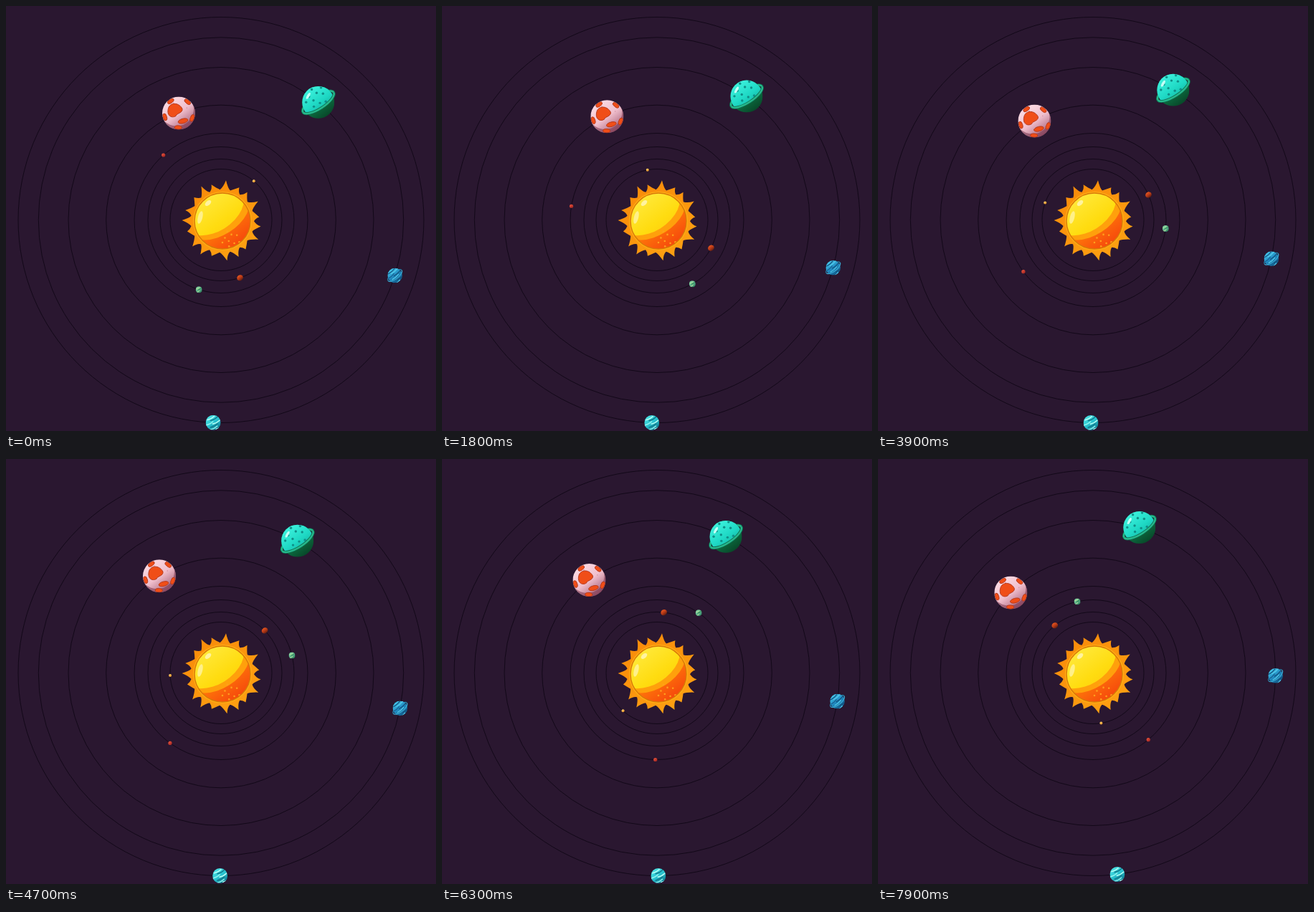
These frames come from a looping animation (600x593 px, 8000 ms). An HTML page with a canvas:

```html
<!DOCTYPE html>
<html lang="en">
<head>
<meta charset="utf-8">
<title>Solar system</title>
<style>
html, body { margin: 0; width: 100%; height: 100%; overflow: hidden; background: #2a1730; }
canvas { display: block; }
</style>
</head>
<body>
<canvas id="stage" width="600" height="593"></canvas>
<script>
const ctx = document.getElementById('stage').getContext('2d');
const LOOP = 8000, STEP = 100, CX = 300, CY = 298.5;
const RAD = Math.PI / 180, TAU = Math.PI * 2, GOLDEN = 137.5;

const polar = (r, deg) => [r * Math.cos(deg * RAD), r * Math.sin(deg * RAD)];

function paint(fill, stroke, width = 1) {
  if (fill) { ctx.fillStyle = fill; ctx.fill(); }
  if (stroke) { ctx.strokeStyle = stroke; ctx.lineWidth = width; ctx.stroke(); }
}

function oval(x, y, rx, ry, fill, tilt = 0, stroke, width) {
  ctx.beginPath();
  ctx.ellipse(x, y, rx, ry, tilt * RAD, 0, TAU);
  paint(fill, stroke, width);
}

function fade(r, ...colors) {
  const g = ctx.createLinearGradient(-r * .6, -r * .8, r * .6, r * .8);
  colors.forEach((c, i) => g.addColorStop(i / (colors.length - 1), c));
  return g;
}

// Draws the details clipped to a disc.
function ball(r, fill, details) {
  ctx.save();
  ctx.beginPath();
  ctx.arc(0, 0, r, 0, TAU);
  ctx.clip();
  ctx.fillStyle = fill;
  ctx.fillRect(-r, -r, 2 * r, 2 * r);
  details();
  ctx.restore();
}

// Dots on a sunflower spiral.
function dots(count, spread, size, color, x = 0, y = 0) {
  for (let i = 1; i <= count; i++) {
    const [dx, dy] = polar(spread * Math.sqrt(i / count), i * GOLDEN);
    oval(x + dx, y + dy, size, size, color);
  }
}

// Slanted bands of alternating colour, broken up by a sine.
function bands(r, gap, tilt, colors) {
  ctx.save();
  ctx.rotate(tilt * RAD);
  for (let y = -r + gap, i = 0; y < r; y += gap, i++) {
    const x = r * .5 * Math.sin(i * 2.4);
    ctx.beginPath();
    ctx.moveTo(x - r * .6, y);
    ctx.quadraticCurveTo(x, y + gap * .6, x + r * .6, y);
    paint(null, colors[i % colors.length], gap * .5);
  }
  ctx.restore();
}

function hoop(rx, ry, tilt, from, color, width) {
  ctx.beginPath();
  ctx.ellipse(0, 0, rx, ry, tilt * RAD, from * RAD, (from + 180) * RAD);
  paint(null, color, width);
}

function sun() {
  const rays = 19, turn = 360 / rays, first = -85;
  ctx.save();
  ctx.translate(302, 300);
  ctx.beginPath();
  ctx.moveTo(...polar(44, first - turn / 2));
  for (let i = 0; i < rays; i++) {
    const a = first + i * turn;
    const tip = polar(54 + 3 * Math.cos(i * 2.2), a + 3 * Math.sin(i * 2));
    ctx.quadraticCurveTo(...polar(47, a - turn / 5), ...tip);
    ctx.quadraticCurveTo(...polar(46, a + turn / 4), ...polar(44, a + turn / 2));
  }
  paint(fade(55, '#f98c0a', '#fda012'));
  oval(0, 0, 41, 41, '#ffae14');
  ball(39, fade(39, '#ff9a08', '#ff7a0a', '#f64a0c'), () => {
    oval(-6, -9, 48, 29, '#ffa00c', -32);
    oval(-14, -17, 48, 32, fade(39, '#ffe838', '#ffdc10', '#ffc40c'), -32);
    dots(9, 13, 1.3, '#ffa01d', 12, 25);
    oval(-31, -5, 3.2, 9, '#fff08a', 14);
    oval(-20, -25, 5, 3, '#fff3a0', -40);
  });
  oval(0, 0, 39, 39, null, 0, '#d97808', 1.4);
  ctx.restore();
}

function rosy() {
  const land = '#f04e18', edge = '#b5381c';
  ball(23, fade(23, '#fbdbe3', '#f0bfcd', '#a8647c'), () => {
    ctx.beginPath();
    ctx.arc(0, 0, 26, 0, TAU);
    ctx.arc(-3, -6, 24, 0, TAU, true);
    paint('rgba(110,45,70,.5)');
    dots(10, 19, .9, '#d99bab');
    for (let a = -124; a < 200; a += 72) oval(...polar(20, a), 2.6, 5, land, a, edge);
    oval(6, 11, 7, 3.2, land, -15, edge);
    ctx.beginPath();
    ctx.moveTo(-14, -8);
    ctx.bezierCurveTo(-10, -16, 1, -14, 5, -6);
    ctx.bezierCurveTo(6, 0, -3, 0, -4, 4);
    ctx.bezierCurveTo(-10, 8, -18, 3, -14, -8);
    paint(land, edge);
  });
}

function teal() {
  const ring = from => {
    hoop(25.5, 9, -33, from, '#0d6a4e', 4);
    hoop(25.5, 9, -33, from, '#27b98c', 2.4);
  };
  ring(180);
  ball(22.5, fade(22, '#12875a', '#0d7446', '#084a2a'), () => {
    oval(-5, -8, 28, 20, fade(22, '#3cf0dc', '#1ed8c4', '#10a592'), -33);
    dots(10, 16, 1.7, '#0f8f88', -3, -6);
    oval(-14, -9, 1.8, 5, '#c4fff6', 30);
  });
  ring(0);
}

function blue() {
  hoop(12, 5, -38, 180, '#2585ac', 1.2);
  ball(10.3, fade(10, '#43c4e8', '#2089c0', '#125a88'), () =>
    bands(10, 2.4, -40, ['#12507c', '#56cdec', '#166091']));
  hoop(12, 5, -38, 0, '#3aaed6', 1.2);
}

function aqua() {
  ball(10.5, fade(10, '#48e0e2', '#28c2cf', '#128297'), () =>
    bands(10, 2.8, -28, ['#b5fff6', '#12798c', '#8df2ee']));
}

function amber() { oval(0, 0, 2, 2, fade(2, '#ffd06a', '#e88f24')); }
function red() { oval(0, 0, 2.6, 2.6, fade(2.6, '#e8503a', '#a52823')); }

function brick() {
  oval(0, 0, 4.5, 3.9, fade(4, '#e8581f', '#b83a18', '#5f1d0e'), -35);
}

function green() {
  ball(4.5, fade(4, '#7ed6a2', '#3b8d72'), () => bands(4.5, 2, -30, ['#b5dc9a', '#328d55']));
}

// Orbit radius, start angle and degrees per second (counterclockwise), picture.
const PLANETS = [
  [71, 49.8, 28.3, amber],
  [85, -71.8, 24.65, brick],
  [102, -107.6, 25.85, green],
  [121, 131.6, 21.8, red],
  [160.3, 111.6, 2.31, rosy],
  [213, 50.4, 2.03, teal],
  [254.7, -17.7, 1.39, blue],
  [283, -92.2, .41, aqua]
];

function draw(now) {
  const t = Math.floor(now % LOOP / STEP) * STEP / 1000;
  const drift = 5.2 * Math.max(0, t - 6.775); // all planets gain speed near the end
  ctx.fillStyle = '#2a1730';
  ctx.fillRect(0, 0, 600, 593);
  for (const [r] of PLANETS) oval(CX, CY, r, r, null, 0, '#120818');
  sun();
  for (const [r, start, speed, picture] of PLANETS) {
    const [x, y] = polar(r, -(start + speed * t + drift));
    ctx.save();
    ctx.translate(CX + x, CY + y);
    picture();
    ctx.restore();
  }
}

const begin = performance.now();
function frame() {
  draw(performance.now() - begin);
  requestAnimationFrame(frame);
}
frame();
</script>
</body>
</html>
```
